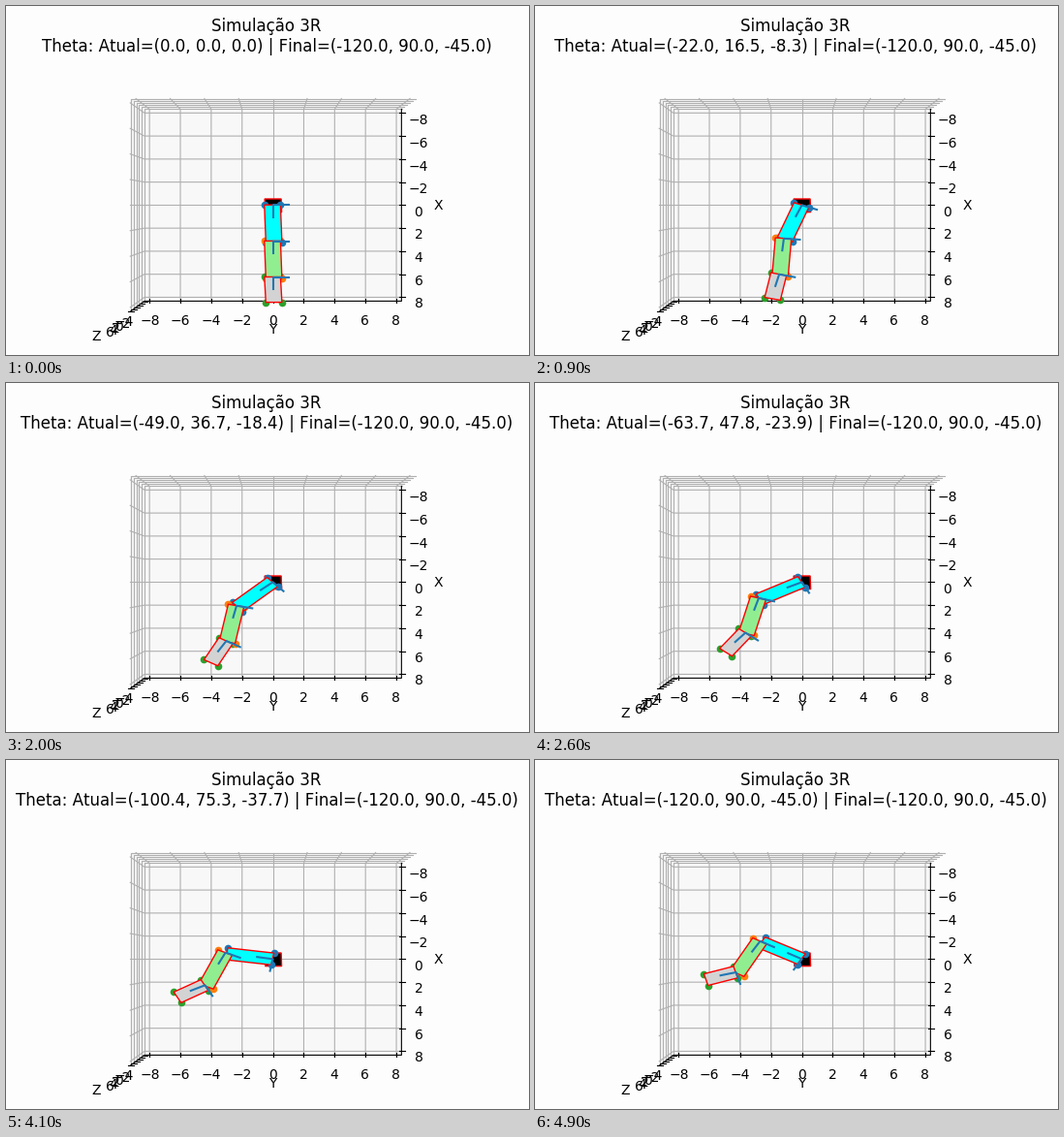
Animation of 540x360 px, one loop 7.9 s. Source, as a matplotlib script:

```python
import matplotlib.pyplot as plt
import numpy as np
from matplotlib.animation import FuncAnimation
from matplotlib.patches import Polygon

# plain advance widths, without fine kerning
plt.rcParams["text.kerning_factor"] = 6

W, H = 540, 360
FINAL = (-120.0, 90.0, -45.0)
STEPS, FRAMES, INTERVAL = 50, 79, 100
LENGTHS = (3, 3, 2)
FILLS = ("cyan", "lightgreen", "lightgray")
DOTS = ("C0", "C1", "C2")
GRID = dict(color="#b0b0b0", lw=0.8, zorder=1)
SPINE = dict(color="black", lw=0.8, zorder=1.5)

# view limits with the small 3D margin
LIM = 8 + 16 / 48
ZMIN, ZMAX = -4 - 10 / 48, 6 + 10 / 48
CX, CY = 275.6, 205.4

path = np.column_stack([np.linspace(0, a, STEPS) for a in FINAL])


def project(x, y, z=0.0):
    """Perspective seen from straight above: x points down, y to the right."""
    depth = 10 - (z - 1) / 10
    return np.array([CX + 167.6 * y / depth, CY + 125.0 * x / depth])


fig = plt.figure(figsize=(W / 100, H / 100), dpi=100, facecolor="#fdfdfd")
ax = fig.add_axes([0, 0, 1, 1])
ax.set_xlim(0, W)
ax.set_ylim(H, 0)
ax.axis("off")


def line(points, **style):
    px = np.array([project(*p) for p in points])
    ax.plot(px[:, 0], px[:, 1], **style)


def pane(points, shade):
    ax.add_patch(Polygon([project(*p) for p in points], facecolor=str(shade),
                         edgecolor="none", zorder=0))


def label(x, y, text):
    ax.text(x, y + 5, text, fontsize=10, ha="center", va="baseline", zorder=6)


def number(v):
    return str(v).replace("-", "\u2212")


def draw_box():
    a, n, f = LIM, ZMAX, ZMIN
    pane([(-a, -a, f), (-a, a, f), (a, a, f), (a, -a, f)], 0.9725)
    pane([(-a, -a, f), (-a, a, f), (-a, a, n), (-a, -a, n)], 0.975)
    pane([(-a, -a, f), (a, -a, f), (a, -a, n), (-a, -a, n)], 0.96)

    for v in range(-8, 9, 2):
        line([(v, a, f), (v, -a, f), (v, -a, n)], **GRID)
        line([(a, v, f), (-a, v, f), (-a, v, n)], **GRID)
        line([(v, a - 0.17, f), (v, a + 0.25, f)], **SPINE)
        line([(a - 0.22, v, f), (a + 0.17, v, f)], **SPINE)
        label(426, 211.9 + 11.8 * v, number(v))
        label(275.5 + 15.9 * v, 324.2, number(v))

    for z in range(-4, 7, 2):
        line([(a, -a, z), (-a, -a, z), (-a, a, z)], **GRID)
        line([(a, -a + 0.2, z), (a, -a - 0.13, z)], **SPINE)
        t = (z + 4) / 10
        label(121.8 - 14 * t, 325.3 + 11 * t, number(z))

    line([(-a, a, f), (a, a, f), (a, -a, f), (a, -a, n)], **SPINE)
    label(446.4, 205, "X")
    label(275.4, 333, "Y")
    label(93, 340.4, "Z")


draw_box()

ax.add_patch(Polygon([(267.1, 199), (284.1, 199), (284.6, 212.6), (267.9, 212.6)],
                     facecolor="black", edgecolor="red", lw=1, zorder=2))
title = ax.text(269, 12.5, "", fontsize=12, ha="center", va="top",
                linespacing=1.2, zorder=6)


def dot_set(color, z):
    return ax.plot([], [], "o", color=color, ms=5.5, mew=0, zorder=z)[0]


links = []
for i in range(3):
    links.append(dict(
        body=Polygon(np.zeros((4, 2)), facecolor=FILLS[i], edgecolor="red",
                     lw=1, zorder=4 + 0.1 * i),
        low=dot_set(DOTS[i], 3),
        mid=dot_set(DOTS[i], 3.1),
        top=dot_set(DOTS[i], 3.2),
        frame=ax.plot([], [], color="C0", lw=1.5, zorder=5)[0],
    ))
    ax.add_patch(links[i]["body"])


def update(k):
    theta = path[min(k, STEPS - 1)]
    now = ", ".join(f"{a:.1f}" for a in theta)
    end = ", ".join(f"{a:.1f}" for a in FINAL)
    title.set_text(f"Simulação 3R\nTheta: Atual=({now}) | Final=({end})")

    joint = np.zeros(2)
    for link, size, a in zip(links, LENGTHS, np.radians(np.cumsum(theta))):
        along = np.array([np.cos(a), np.sin(a)])
        side = np.array([-np.sin(a), np.cos(a)])
        tip = joint + size * along

        # the two ends sit at slightly different offsets
        near = [project(*(joint + s * side)) + (-0.5, -0.2) for s in (-0.5, 0.5)]
        far = [project(*(tip + s * side)) + (1.0, 1.2) for s in (-0.5, 0.5)]
        link["body"].set_xy([near[0], near[1], far[1], far[0]])
        link["low"].set_data(*np.transpose([near[1]]))
        link["mid"].set_data(*np.transpose(far))
        link["top"].set_data(*np.transpose([near[0]]))

        corner = [joint + along, joint, joint + side]
        link["frame"].set_data(*np.transpose([project(*p) for p in corner]))
        joint = tip
    return []


anim = FuncAnimation(fig, update, frames=FRAMES, interval=INTERVAL,
                     repeat=True, repeat_delay=0, blit=False)
plt.show()
```
